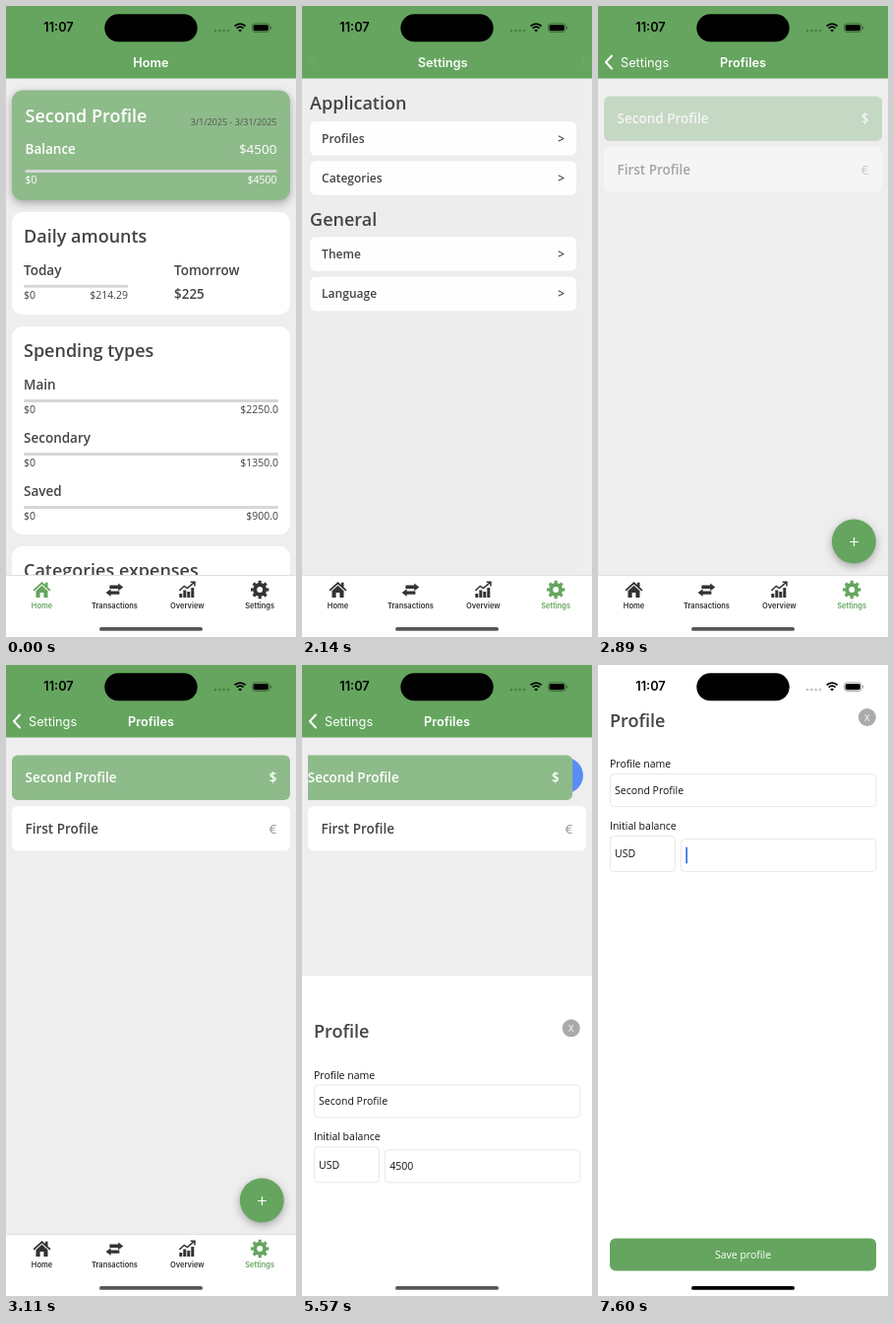
These frames come from a looping animation (295x640 px, 8000 ms). An HTML page:

```html
<!DOCTYPE html>
<html lang="en">
<head>
<meta charset="utf-8">
<title>Budget app</title>
<style>
html, body { margin: 0; width: 100%; height: 100%; overflow: hidden; background: #eee; }
svg { display: block; width: 100vw; height: 100vh; }
text { font-family: "Open Sans", "Noto Sans", sans-serif; fill: #444; white-space: pre; }
.ui { font-family: Inter, Roboto, sans-serif; }
.b { font-weight: 600; }
.w { fill: #fff; }
.k { fill: #111; }
.end { text-anchor: end; }
.mid { text-anchor: middle; }
.lift { filter: drop-shadow(0 3px 4px rgba(0, 0, 0, .3)); }
.tab { color: #333; }
.tab text { fill: currentColor; }
.tab.on { color: #65a55f; }
</style>
</head>
<body>
<svg id="stage" viewBox="0 0 295 640"></svg>
<script>
const GREEN = '#65a55f', PALE = '#8ebb8a', BG = '#eee', LOOP = 8000;
// moments at which the screen refreshes
const TICKS = [0, 770, 880, 990, 1100, 1210, 1340, 2140, 2250, 2360, 2480, 2590,
  2770, 2880, 3000, 3110, 4660, 4760, 5570, 5680, 5790, 5910, 6220, 6470,
  7010, 7120, 7310, 7460, 7600];

const text = (x, y, s, size, cls = '', extra = '') =>
  `<text x="${x}" y="${y}" font-size="${size}" class="${cls}" ${extra}>${s}</text>`;
const box = (x, y, w, h, fill, r = 0, extra = '') =>
  `<rect x="${x}" y="${y}" width="${w}" height="${h}" rx="${r}" fill="${fill}" ${extra}/>`;
const path = (d, extra = 'fill="currentColor"') => `<path d="${d}" ${extra}/>`;
const group = (id, inner, extra = '') => `<g id="${id}" ${extra}>${inner}</g>`;
const header = box(0, 0, 295, 73.5, GREEN);
const title = s => text(147.5, 61.7, s, 12.75, 'ui b w mid');
const heading = (x, y, s, cls = '') => text(x, y, s, 18, 'b ' + cls);

// progress bar with its limits below
const meter = (x1, x2, y, max, cls = '') =>
  box(x1, y, x2 - x1, 3, '#d6d6d6', 1) +
  text(x1, y + 14, '$0', 10.5, cls) + text(x2, y + 14, max, 10.5, 'end ' + cls);
const spending = (y, name, max) =>
  text(18, y, name, 13.5, 'b') + meter(18, 277, y + 10.5, max);

const home = group('home',
  box(0, 73, 295, 567, BG) + header + title('Home') +
  box(6, 85.5, 283, 111.5, PALE, 11, 'class="lift"') +
  heading(19.5, 118, 'Second Profile', 'w') +
  text(275.5, 121, '3/1/2025 - 3/31/2025', 9, 'end', 'opacity=".85"') +
  text(19.5, 150.3, 'Balance', 13.5, 'b w') + text(275.5, 150.3, '$4500', 13.5, 'w end') +
  meter(19.5, 275.5, 166, '$4500', 'w') +
  box(6, 209, 283, 104, '#fff', 11) + heading(18, 240.3, 'Daily amounts') +
  text(18, 272.7, 'Today', 13.5, 'b') + meter(18, 124, 282.7, '$214.29') +
  text(171, 272.7, 'Tomorrow', 13.5, 'b') + text(171, 297.3, '$225', 13.5, 'b') +
  box(6, 325, 283, 211, '#fff', 11) + heading(18, 356.3, 'Spending types') +
  spending(388.5, 'Main', '$2250.0') +
  spending(442.5, 'Secondary', '$1350.0') +
  spending(496.5, 'Saved', '$900.0') +
  box(6, 548, 283, 92, '#fff', 11) + heading(18, 579.3, 'Categories expenses'));

const option = (y, s) => box(12, y, 271, 34.5, '#fff', 6) +
  text(24, y + 21.7, s, 12, 'b') + text(271, y + 21.7, '&gt;', 12, 'b end');

const settings = group('settings',
  group('options', box(0, 73, 295, 567, BG) +
    heading(12, 105.3, 'Application') + option(117, 'Profiles') + option(157.3, 'Categories') +
    heading(12, 222.7, 'General') + option(234.3, 'Theme') + option(274.7, 'Language')) +
  box(0, 73, 295, 567, '#000', 0, 'id="shade"') +
  group('profiles', box(0, 73, 295, 567, BG) +
    group('list',
      '<circle cx="267.5" cy="112" r="18.5" fill="#5b8bf5"/>' +
      path('M261 118.5l.8-4 8.4-8.4 3.2 3.2-8.4 8.4z', 'fill="#fff"') +
      `<g clip-path="url(#lane)">${group('row', box(6, 91.5, 283, 45.5, PALE, 6) +
        text(19.5, 119.2, 'Second Profile', 13.5, 'b w') + text(275.5, 119.2, '$', 13.5, 'b w end'))}</g>` +
      box(6, 143, 283, 45.5, '#fff', 6) +
      text(19.5, 170.8, 'First Profile', 13.5, 'b') +
      text(275.5, 170.8, '€', 13.5, 'end', 'opacity=".55"')) +
    `<circle cx="260.3" cy="543" r="22.5" fill="${GREEN}" class="lift"/>` +
    path('M256 543.5h9M260.5 539v9', 'stroke="#fff" stroke-width="1.2"')) +
  header + group('oldTitle', title('Settings')) + group('newTitle', title('Profiles')) +
  group('chevron', path('M14 50.5l-6 6.5 6 6.5',
    'fill="none" stroke="#fff" stroke-width="2" stroke-linecap="round" stroke-linejoin="round"')) +
  group('back', text(23, 61.7, 'Settings', 12.75, 'ui w')));

const icons = {
  Home: path('M-9 .3L0-8 3.4-4.9V-7.2H6V-2.5L9 .3 7.8 1.5 0-5.6-7.8 1.5z') +
    path('M-6 1.2L0-4.3 6 1.2V8H1.9V3H-1.9V8H-6z'),
  Transactions: path('M-5-4.4H3.8V-6.6L8.8-2.6 3.8 1.2V-1H-5z') +
    path('M5 1.4H-3.8V-.8L-8.8 3-3.8 7V4.8H5z'),
  Overview: path('M-8 4h3v4h-3zM-4 .5h3V8h-3zM0 2h3v6h-3zM4-2h3V8h-3z') +
    path('M-8 1L-3-3.6 0-1.4 7.2-7.4M3.4-7.8H7.7V-3.5',
      'fill="none" stroke="currentColor" stroke-width="1.5"'),
  Settings: '<circle r="5" fill="none" stroke="currentColor" stroke-width="4"/>' +
    '<circle r="7.8" fill="none" stroke="currentColor" stroke-width="2.8" ' +
    'pathLength="16" stroke-dasharray="1" stroke-dashoffset=".5"/>'
};
const tabs = box(0, 577, 295, 63, '#fff') + box(0, 577, 295, .6, '#ccc') +
  Object.keys(icons).map((name, i) => group('tab' + name,
    `<g transform="translate(0 592)">${icons[name]}</g>` + text(0, 611.2, name, 7.5, 'ui b mid'),
    `class="tab" transform="translate(${36.5 + i * 73.9} 0)"`)).join('');

const field = (x, y, w, h) => box(x, y, w, h, '#fff', 4, 'stroke="#e2e2e2" stroke-width=".8"');
const modal = group('modal', box(0, 0, 295, 640, '#fff') +
  heading(12, 63.2, 'Profile') +
  '<circle cx="273.8" cy="53" r="9" fill="#aaa"/>' + text(273.8, 56.5, 'X', 9.5, 'w mid') +
  text(12, 104.3, 'Profile name', 10.5, 'k') + field(12.4, 110.6, 270.4, 33) +
  text(17, 131.2, 'Second Profile', 10.5, 'k') +
  text(12, 167, 'Initial balance', 10.5, 'k') + field(12.4, 173.5, 66, 36) +
  text(17, 195.3, 'USD', 10.5, 'k') + field(84.4, 176.6, 198.4, 33) +
  text(89.3, 196.8, '', 10.5, 'k', 'id="amount"') +
  box(0, 184.5, 1.7, 17, '#3470e4', .8, 'id="caret"') +
  box(12, 581.5, 271, 33, GREEN, 6) + text(147.5, 602, 'Save profile', 10.5, 'w mid'));

const status = text(38.3, 26.4, '11:07', 12.75, 'ui b', 'style="fill:#000"') +
  box(100.3, 8.3, 94.4, 28, '#000', 14) +
  [213, 217.3, 221.6, 225.9].map(x => `<circle cx="${x}" cy="25" r="1.3" opacity=".25"/>`).join('') +
  path('M232.6 20.3a7.8 7.8 0 0 1 11 0M234.7 22.6a4.8 4.8 0 0 1 6.8 0',
    'fill="none" stroke="#000" stroke-width="1.8"') +
  path('M238.1 26.6l-1.9-2a2.7 2.7 0 0 1 3.8 0z') +
  box(250.4, 17.7, 17.6, 8.8, 'none', 2.8, 'stroke="#000" stroke-opacity=".4" stroke-width=".8"') +
  box(251.6, 18.9, 15.2, 6.4, '#000', 1.7) + box(269, 20.6, 1, 3, '#000', .5, 'opacity=".4"') +
  box(95, 630, 105, 3.8, '#000', 1.9, 'id="bar"');

stage.innerHTML = '<clipPath id="lane"><rect x="6" y="90" width="283" height="48"/></clipPath>' +
  box(0, 0, 295, 640, BG) + home + settings + tabs + modal + status;

const el = id => document.getElementById(id);
const clamp = v => Math.min(1, Math.max(0, v));
const fade = (id, v) => el(id).setAttribute('opacity', v);
const move = (id, x, y = 0) => el(id).setAttribute('transform', `translate(${x} ${y})`);
// distance still to go of a critically damped spring, from 1 to 0
const spring = (ms, rate) => {
  const k = Math.max(0, ms) * rate / 1000;
  return (1 + k) * Math.exp(-k);
};
const swipe = t => t < 4660 ? 0 : t < 5478 ? -54 * (1 - spring(t - 4580, 24))
  : -54 * spring(t - 5440, 20.5);

function draw(t) {
  const shown = 1 - (1 - clamp((t - 740) / 440)) ** 3;
  const onSettings = t >= 770;
  fade('home', onSettings ? 1 - shown : 1);
  fade('settings', onSettings ? shown : 0);
  el('tabHome').classList.toggle('on', !onSettings);
  el('tabSettings').classList.toggle('on', onSettings);

  const left = spring(t - 2120, 16.5);
  move('profiles', 295 * left);
  move('options', -88.5 * (1 - left));
  fade('shade', .1 * (1 - left));
  move('oldTitle', -101 * (1 - left));
  fade('oldTitle', clamp(left * 1.4 - .4));
  move('newTitle', 168 * left);
  move('back', 104 * left);
  for (const id of ['newTitle', 'back', 'chevron']) fade(id, 1 - left);

  fade('list', clamp((t - 2740) / 330));
  move('row', swipe(t));
  move('modal', 0, t < 5500 ? 640 : 640 * spring(t - 5478, 18.5));

  const digits = t < 7310 ? 4 : t < 7460 ? 2 : t < 7600 ? 1 : 0;
  el('amount').textContent = '4500'.slice(0, digits);
  el('caret').setAttribute('x', 89.3 + 6 * digits);
  fade('caret', t < 6470 ? 0 : t < 7010 || t >= 7310 ? 1 : t < 7120 ? .5 : 0);
  fade('bar', t < 7010 ? .66 : t < 7120 ? .85 : 1);
}

const start = performance.now();
let last = -1;
function loop() {
  const now = (performance.now() - start) % LOOP;
  const tick = TICKS.findLast(t => t <= now);
  if (tick !== last) draw(last = tick);
  requestAnimationFrame(loop);
}
loop();
</script>
</body>
</html>
```
